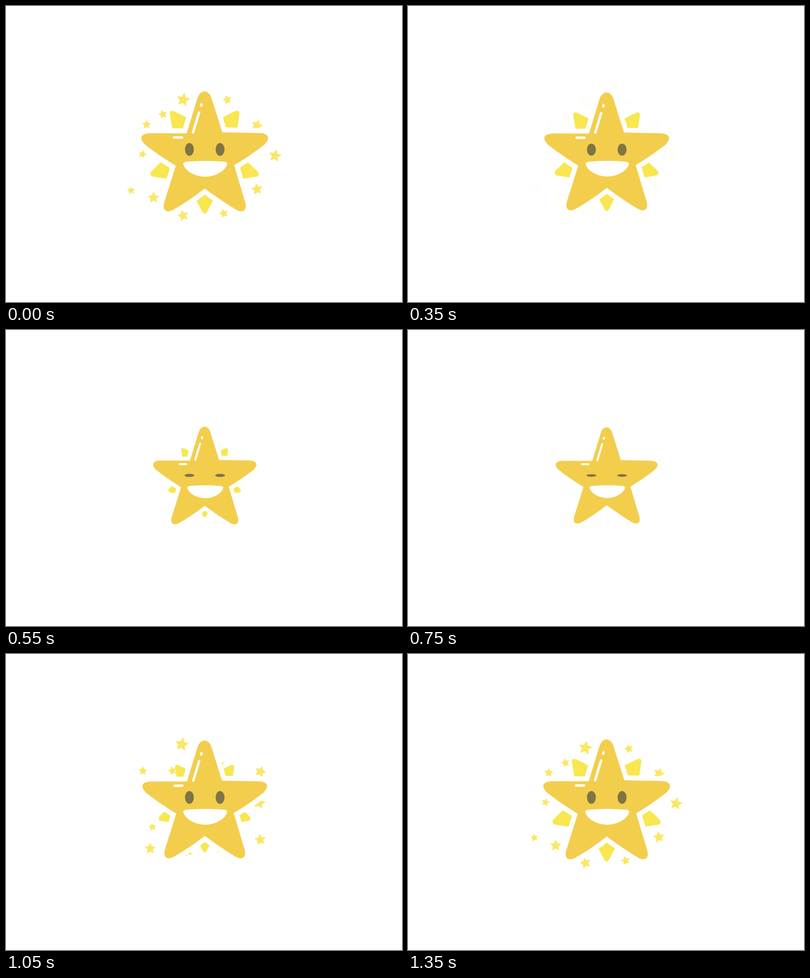
Recreate the animation shown at these times as an HTML page with a canvas. Size 800x600 px, loop 1400 ms.

```html
<!DOCTYPE html>
<html lang="en">
<head>
<meta charset="utf-8">
<title>Happy star</title>
<style>
  html, body { margin: 0; width: 100%; height: 100%; overflow: hidden; background: #fff; }
  canvas { display: block; }
</style>
</head>
<body>
<canvas id="stage" width="800" height="600"></canvas>
<script>
const ctx = document.getElementById('stage').getContext('2d');
const LOOP = 1400, STEP = 50;
const CX = 401.5, CY = 295;
const GOLD = '#f3ce4d', RAY = '#f8e750', SPARK = '#fae766', EYE = '#7f7446';

const body = new Path2D(`M365 258 L387 186 C393 169 409 169 415 186 L437 256 L511 257.5
  C531 258 535 268 522 281 Q497 301 461 323 L483 397 C488 413 480 421 465 413
  Q437 396 401.5 370 Q368 396 338 413 C323 421 315 413 320 397 L343 324
  Q306 301 281 281 C268 268 272 258 292 258 Z`);
const rays = new Path2D(`M336 250 L331 219 Q330 210 339 213 L364 225.5 L357 250 Z
  M438 225.5 L462 213.5 Q472 210 471.5 218 L467 250 L444 250 Z
  M312 317 L294 335 Q288 343 297 346 L324 350 L336 329 Z
  M489 317 L508 335 Q514 343 506 346 L479 350 L468 327 Z
  M401.5 378 L418 394 L407 416 Q401.5 426 396 416 L384 393 Z`);
const mouth = new Path2D(`M358 320 Q358 316 366 315.5 Q402 312.5 440 315.5 Q447 316 447 320
  C444 334 423 346 402.5 346 C382 346 361 334 358 320 Z`);
const shine = new Path2D('M339.5 266.5 H355.5 M390 216 L378 256 M394.2 202 L395 199.5');

// x, y, radius, tilt in degrees; late sparks also have a lag
const earlySparks = [
  [358, 190, 14, 10], [284, 240.5, 9, 3], [507, 242, 11.5, 20],
  [298, 388.5, 11.5, 0], [507, 371.5, 11.5, -8]
];
const lateSparks = [
  [317, 219.5, 8.8, -15, .14], [447, 190, 9, -15, .2], [543.5, 303.5, 12.8, 10, .14],
  [276, 300.5, 8, 15, .15], [252.5, 374, 7.7, -10, .18], [358, 425, 11.3, -15, .12],
  [440, 420.5, 9, -15, .13]
];

const clamp = u => Math.max(0, Math.min(1, u));
const smooth = (t, a, b) => { const u = clamp((t - a) / (b - a)); return u * u * (3 - 2 * u); };
const quartInOut = u => u < .5 ? 8 * u ** 4 : 1 - 8 * (1 - u) ** 4;

function scaled(k, x, y, draw) {
  ctx.save();
  ctx.translate(x, y);
  ctx.scale(k, k);
  ctx.translate(-x, -y);
  draw();
  ctx.restore();
}

function drawSpark(x, y, r, tilt, k) {
  x = CX + (x - CX) * k;
  y = CY + (y - CY) * k;
  ctx.beginPath();
  for (let i = 0; i < 10; i++) {
    const a = (tilt + i * 36 - 90) * Math.PI / 180;
    const d = i % 2 ? r * .43 : r - 1;
    ctx.lineTo(x + d * Math.cos(a), y + d * Math.sin(a));
  }
  ctx.closePath();
  ctx.fill();
  ctx.lineWidth = 1.6;
  ctx.stroke();
}

function drawSparks(t) {
  const leaving = t < 450;
  if (!leaving && t < 800) return;
  ctx.fillStyle = ctx.strokeStyle = SPARK;
  ctx.globalAlpha = leaving ? 1 - smooth(t, 50, 400) : 1;
  const inward = 1 - .05 * (t / 350) ** 2;
  const s = t - 900;
  const bounce = 1 + .22 * Math.exp(-s / 130) * Math.sin(Math.PI * s / 240);
  const remaining = ((LOOP - t) / 250) ** 1.43;
  for (const [x, y, r, tilt] of earlySparks) drawSpark(x, y, r, tilt, leaving ? inward : bounce);
  for (const [x, y, r, tilt, lag] of lateSparks)
    drawSpark(x, y, r, tilt, leaving ? inward : 1 - lag * remaining);
  ctx.globalAlpha = 1;
}

function drawRays(t) {
  const k = t < 700 ? 1 - .043 * (t / 350) ** 4.5 : 1 - .07 * ((LOOP - t) / 250) ** 2.3;
  if (k < .55) return;
  ctx.fillStyle = RAY;
  scaled(k, CX, CY, () => ctx.fill(rays));
}

function drawBody(squeeze, swell) {
  scaled(1 - .2 * squeeze, CX, CY, () => {
    // the white rim hides whatever comes out from behind
    ctx.strokeStyle = '#fff';
    ctx.lineWidth = 20 + swell;
    ctx.stroke(body);
    ctx.fillStyle = ctx.strokeStyle = GOLD;
    ctx.fill(body);
    if (swell) {
      ctx.lineWidth = swell;
      ctx.stroke(body);
    }
    ctx.strokeStyle = '#fff';
    ctx.lineWidth = 5;
    ctx.stroke(shine);
  });
}

function drawFace(squint) {
  ctx.fillStyle = EYE;
  for (const x of [370.5, 432.5]) {
    ctx.beginPath();
    ctx.ellipse(x, 290.8 + 4.2 * squint, 9 + squint, 13 - 10.7 * squint, 0, 0, 2 * Math.PI);
    ctx.fill();
  }
  ctx.fillStyle = '#fff';
  scaled(1 - .2 * squint, 402.5, 318, () => ctx.fill(mouth));
}

function render(t) {
  ctx.fillStyle = '#fff';
  ctx.fillRect(0, 0, 800, 600);
  const shrink = quartInOut(clamp((t - 178) / 544));
  drawRays(t);
  drawSparks(t);
  drawBody(shrink * (1 - smooth(t, 720, 1120)), 7 * clamp(1 - Math.abs(t - 900) / 150));
  drawFace(shrink * (1 - smooth(t, 720, 995)));
}

ctx.lineCap = ctx.lineJoin = 'round';
const start = performance.now();
function tick() {
  const t = (performance.now() - start) % LOOP;
  render(Math.floor(t / STEP) * STEP);
  requestAnimationFrame(tick);
}
tick();
</script>
</body>
</html>
```
